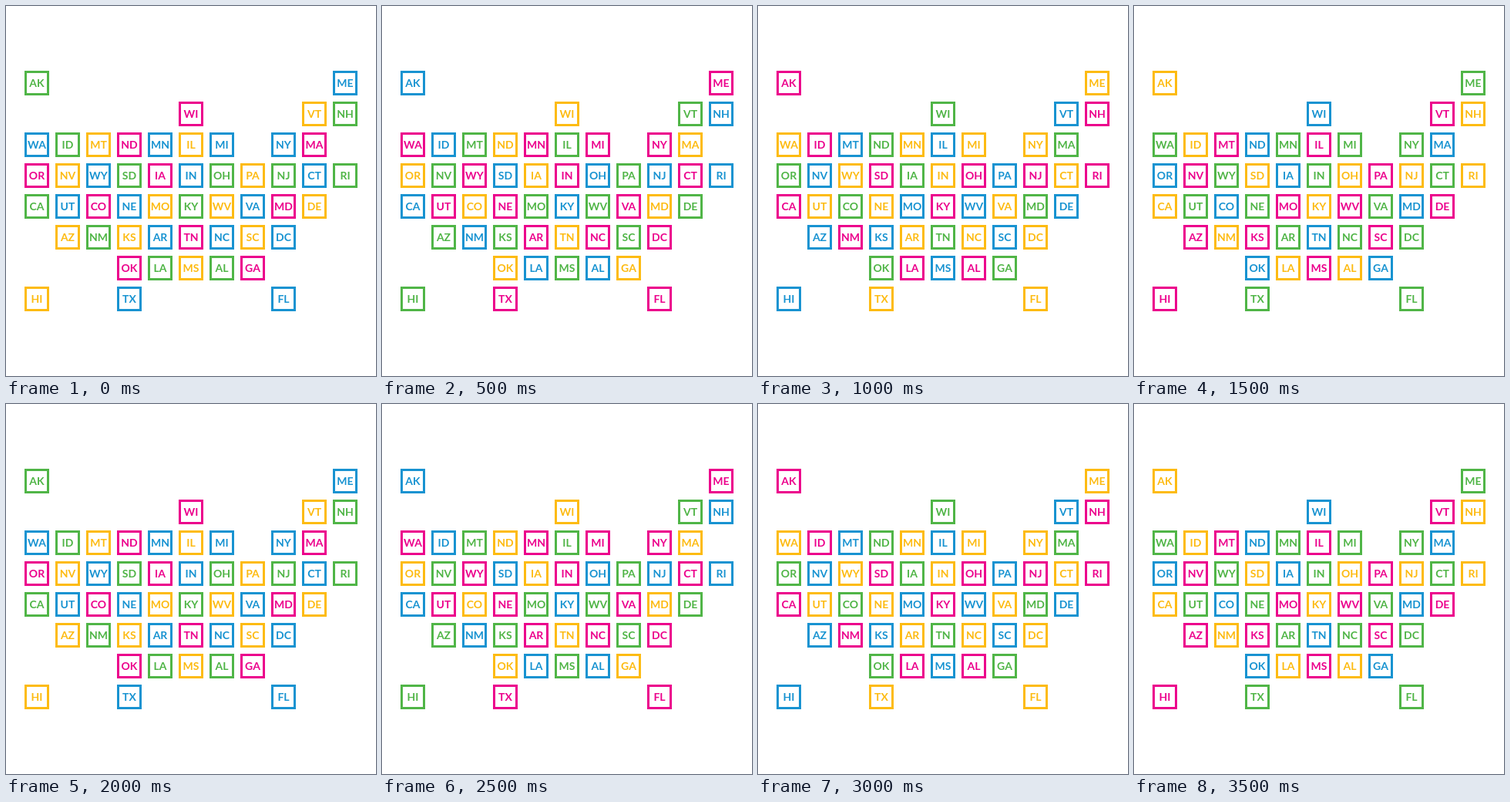
These frames come from a looping animation (480x480 px, 4 s). An HTML page:

```html
<!DOCTYPE html>
<html lang="en">
<head>
<meta charset="utf-8">
<title>State tile map</title>
<style>
  html, body { margin: 0; width: 100%; height: 100%; overflow: hidden; background: #fff; }
  svg { display: block; width: 480px; height: 480px; }
  text { font: 700 14px Lato, sans-serif; text-anchor: middle; fill: currentColor; }
  rect { fill: none; stroke: currentColor; stroke-width: 3; }
</style>
</head>
<body>
<svg id="map" viewBox="0 0 480 480"></svg>
<script>
const NS = "http://www.w3.org/2000/svg";
const COLORS = ["#50b547", "#1893d1", "#ec008c", "#fdbb12"];
const ORDER = "gbpy";
const STEP = 500;
const CELL = 40;

// Each tile: state code + starting colour; "." is an empty cell.
const ROWS = [
  "AKg . . . . . . . . . MEb",
  ". . . . . WIp . . . VTy NHg",
  "WAb IDg MTy NDp MNb ILy MIb . NYb MAp",
  "ORp NVy WYb SDg IAp INb OHg PAy NJg CTb RIg",
  "CAg UTb COp NEb MOy KYg WVy VAb MDp DEy",
  ". AZy NMg KSy ARb TNp NCb SCy DCb",
  ". . . OKp LAg MSy ALg GAp",
  "HIy . . TXb . . . . FLb"
];

const map = document.getElementById("map");

function add(parent, tag, attrs) {
  const el = document.createElementNS(NS, tag);
  for (const key in attrs) el.setAttribute(key, attrs[key]);
  return parent.appendChild(el);
}

// One group per colour phase; tiles inherit its colour.
const groups = COLORS.map(() => add(map, "g", {}));

ROWS.forEach((row, r) => row.split(" ").forEach((tile, c) => {
  if (tile === ".") return;
  const group = groups[ORDER.indexOf(tile[2])];
  const x = CELL * (c + 1);
  const y = 100 + CELL * r;
  add(group, "rect", { x: x - 14.5, y: y - 14.5, width: 29, height: 29 });
  add(group, "text", { x, y: y + 5 }).textContent = tile.slice(0, 2);
}));

function paint() {
  const step = Math.floor(performance.now() / STEP);
  groups.forEach((g, i) => { g.style.color = COLORS[(i + step) % COLORS.length]; });
  requestAnimationFrame(paint);
}
paint();
</script>
</body>
</html>
```
